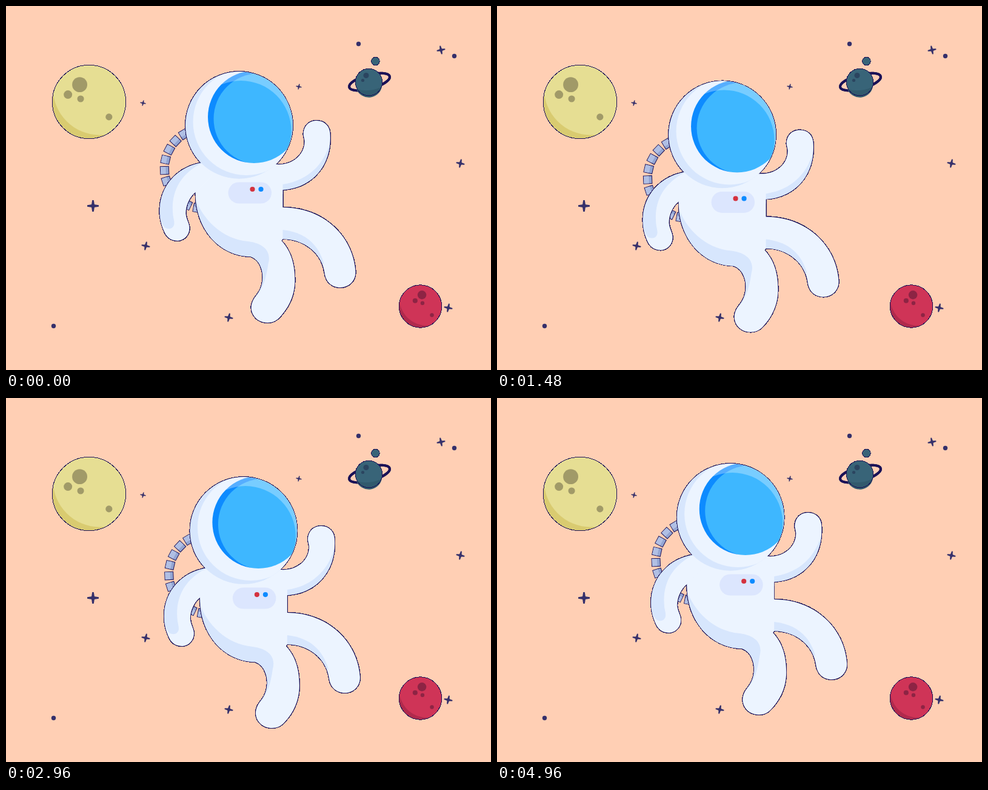
An HTML page for the animation above (5 s loop, 800 by 600 pixels).

```html
<!DOCTYPE html>
<html lang="en">
<head>
<meta charset="utf-8">
<title>Floating astronaut</title>
<style>
  html, body { margin: 0; width: 100%; height: 100%; overflow: hidden; background: #ffcfb4; }
  svg { display: block; width: 100vw; height: 100vh; }
  .line { fill: none; stroke: #1b1257; shape-rendering: crispEdges; }
</style>
</head>
<body>
<svg viewBox="0 0 800 600">
  <defs>
    <path id="torso" d="M325 258C318 275 313 290 313 307C313 369 353 412 404 413
      C412 416 418 422 421 431C426 443 425 462 415 475
      C411 480 405 487 405 498C406 512 417 522 432 522C440 522 447 519 453 512
      C466 498 477 478 477 452C477 428 472 405 455 387
      L457 384C490 384 521 405 526 440
      C528 455 538 464 552 464C566 464 578 453 577 437C573 380 525 332 457 332V303
      C506 300 539 262 535 209
      C534 198 526 189 513 189C500 189 491 198 491 212L493 222C494 244 474 263 446 261Z"/>
    <path id="arm" d="M325 258C285 264 254 295 254 338C254 352 257 362 262 373
      C267 384 276 387 284 387C296 386 304 376 303 364C302 356 298 352 297 342
      C297 328 304 314 313 307L340 280Z"/>
    <circle id="head" cx="385" cy="196.500" r="88.300"/>
    <g id="suit"><use href="#torso"/><use href="#arm"/><use href="#head"/></g>

    <clipPath id="inTorso"><use href="#torso"/></clipPath>
    <clipPath id="inArm"><use href="#arm"/></clipPath>
    <clipPath id="inHead"><use href="#head"/></clipPath>
    <clipPath id="inVisor" clip-path="url(#inHead)"><circle cx="409.500" cy="183" r="76"/></clipPath>
    <path id="spike" d="M-.3 0L-.13 -1H.13L.3 0Z"/>
    <g id="sparkle">
      <use href="#spike"/>
      <use href="#spike" transform="rotate(90)"/>
      <use href="#spike" transform="rotate(180)"/>
      <use href="#spike" transform="rotate(270)"/>
    </g>
  </defs>

  <rect width="800" height="600" fill="#ffcfb4"/>
  <g id="stars" fill="#35306b"></g>
  <g id="planets"></g>

  <g transform="rotate(-15 599.500 125)" fill="none">
    <ellipse id="ring" cx="599.500" cy="125" rx="34.500" ry="11.500" stroke="#1b1257" stroke-width="4"/>
    <use href="#ring" stroke="#386478"/>
  </g>
  <g fill="#386478">
    <circle cx="598.500" cy="125.500" r="22.300"/>
    <circle cx="609.500" cy="91" r="6.800"/>
  </g>
  <path d="M578 137Q600 143 620 133A22 22 0 0 1 578 137Z" fill="#315a6d"/>
  <g fill="#2b4560">
    <circle cx="594" cy="114.500" r="4.500"/>
    <circle cx="588.500" cy="122.500" r="2.600"/>
  </g>
  <g class="line">
    <circle cx="598.500" cy="125.500" r="22.300"/>
    <circle cx="609.500" cy="91" r="6.800"/>
  </g>

  <path id="comet" d="M0 0L-200 113.500L-198 118.500Z" fill="#1b1257" stroke="#1b1257" stroke-width="1.500" stroke-linejoin="round"/>

  <g id="astronaut">
    <g id="hose"></g>
    <use href="#suit" class="line" stroke-width="2.400"/>
    <use href="#suit" fill="#ecf4ff"/>
    <g fill="#d7e6fd">
      <g clip-path="url(#inTorso)">
        <path d="M313 318C325 350 355 384 400 388C430 392 438 408 433 425C430 448 424 466 414 478L400 470L290 420Z"/>
        <path d="M457 294C498 288 524 262 534 228L550 290L457 310Z"/>
        <path d="M457 369C490 373 514 388 525 425L500 420L457 390Z"/>
      </g>
      <path clip-path="url(#inArm)" d="M325 258C285 264 250 295 252 338C254 350 257 357 260 362C263 368 272 369 276 364C280 359 277 352 276 345C272 310 285 278 325 258Z"/>
      <use href="#head"/>
    </g>
    <g clip-path="url(#inHead)">
      <circle cx="397" cy="191" r="88" fill="#ecf4ff"/>
    </g>
    <g clip-path="url(#inVisor)">
      <rect x="320" y="100" width="160" height="170" fill="#0d8bff"/>
      <circle cx="418" cy="186" r="75" fill="#3eb7ff"/>
      <path d="M320 90H490V280H320ZM305 206a83 83 0 0 0 166 0a83 83 0 0 0-166 0Z" fill="#fff" fill-opacity=".3" fill-rule="evenodd"/>
    </g>
    <rect x="367" y="290.500" width="71.500" height="35" rx="17.500" fill="#dce6fe"/>
    <circle cx="407" cy="302" r="4.100" fill="#d4323f"/>
    <circle cx="421" cy="302" r="4.100" fill="#0d8bff"/>
  </g>
</svg>
<script>
const $ = id => document.getElementById(id);
const LOOP = 5000, STEP = 40;

const circle = (x, y, r, attrs = '') => `<circle cx="${x}" cy="${y}" r="${r}" ${attrs}/>`;
const dot = (x, y) => circle(x, y, 3.7);
const sparkle = (x, y, r, turn) =>
  `<use href="#sparkle" transform="translate(${x} ${y}) rotate(${turn}) scale(${r})"/>`;

// One shared moon design, scaled to radius r; shift moves the crater cluster
function planet(id, x, y, r, shift, light, shade, crater) {
  const k = r / 61;
  const pit = (dx, dy, size) => circle(x + dx * k, y + dy * k, size * k);
  return `<clipPath id="${id}">${circle(x, y, r)}</clipPath>` +
    circle(x, y, r, `fill="${shade}"`) +
    `<g clip-path="url(#${id})">${circle(x + 18 * k, y - 23 * k, 78 * k, `fill="${light}"`)}</g>` +
    `<g fill="${crater}">` +
    pit(shift - 15.5, -28.5 - shift / 5, 12.5) +
    pit(shift - 35, -12 - shift / 5, 7) +
    pit(shift - 14, -5 - shift / 5, 5.6) +
    pit(33, 25, 5.6) + '</g>' +
    circle(x, y, r, 'class="line"');
}

// Hose links sit evenly along a circle behind the back
function hose(count) {
  const link = i => `<g transform="translate(328 268) rotate(${239 - 15.4 * i}) translate(66 0)">
    <rect x="-7" y="-6.500" width="14" height="13" fill="#93a5d3" stroke="#1b1257"/>
    <rect x="-2" y="-6" width="8.500" height="12" fill="#b0bfe4"/></g>`;
  return Array.from({ length: count }, (_, i) => link(i)).join('');
}

$('stars').innerHTML =
  dot(581.5, 62.5) + dot(739.5, 82.5) + dot(78.5, 527.5) +
  sparkle(143.5, 329.5, 9.5, 0) +
  sparkle(749.5, 259.5, 7, 12) + sparkle(230.5, 395.5, 7, 12) + sparkle(367.5, 513.5, 7, 12) +
  sparkle(717.5, 72.5, 7, -12) + sparkle(729.5, 497.5, 7, 12) +
  sparkle(226, 160, 4.6, 12) + sparkle(483, 133, 4.6, 12);

$('planets').innerHTML =
  planet('moon', 137, 158, 60.7, 0, '#e6de93', '#d9cb70', '#a19a68') +
  planet('mars', 683.5, 495, 35.2, 20, '#cf3457', '#b02a4c', '#8d2444');

$('hose').innerHTML = hose(10);

function draw(now) {
  const t = Math.floor(now % LOOP / STEP) * STEP;
  const a = t / LOOP * 2 * Math.PI;
  const dx = -0.5 - 13.5 * Math.sin(a), dy = 12 * (1 - Math.cos(a));
  $('astronaut').setAttribute('transform', `translate(${dx.toFixed(2)} ${dy.toFixed(2)})`);

  const x = 102 + (2440 - t) * 1.5;
  $('comet').setAttribute('transform', `translate(${x} ${467 - (x - 102) * 0.6})`);
  $('comet').setAttribute('visibility', t > 1720 && t < 2680 ? 'visible' : 'hidden');
}

const start = performance.now();
function tick() {
  draw(performance.now() - start);
  requestAnimationFrame(tick);
}
tick();
</script>
</body>
</html>
```
